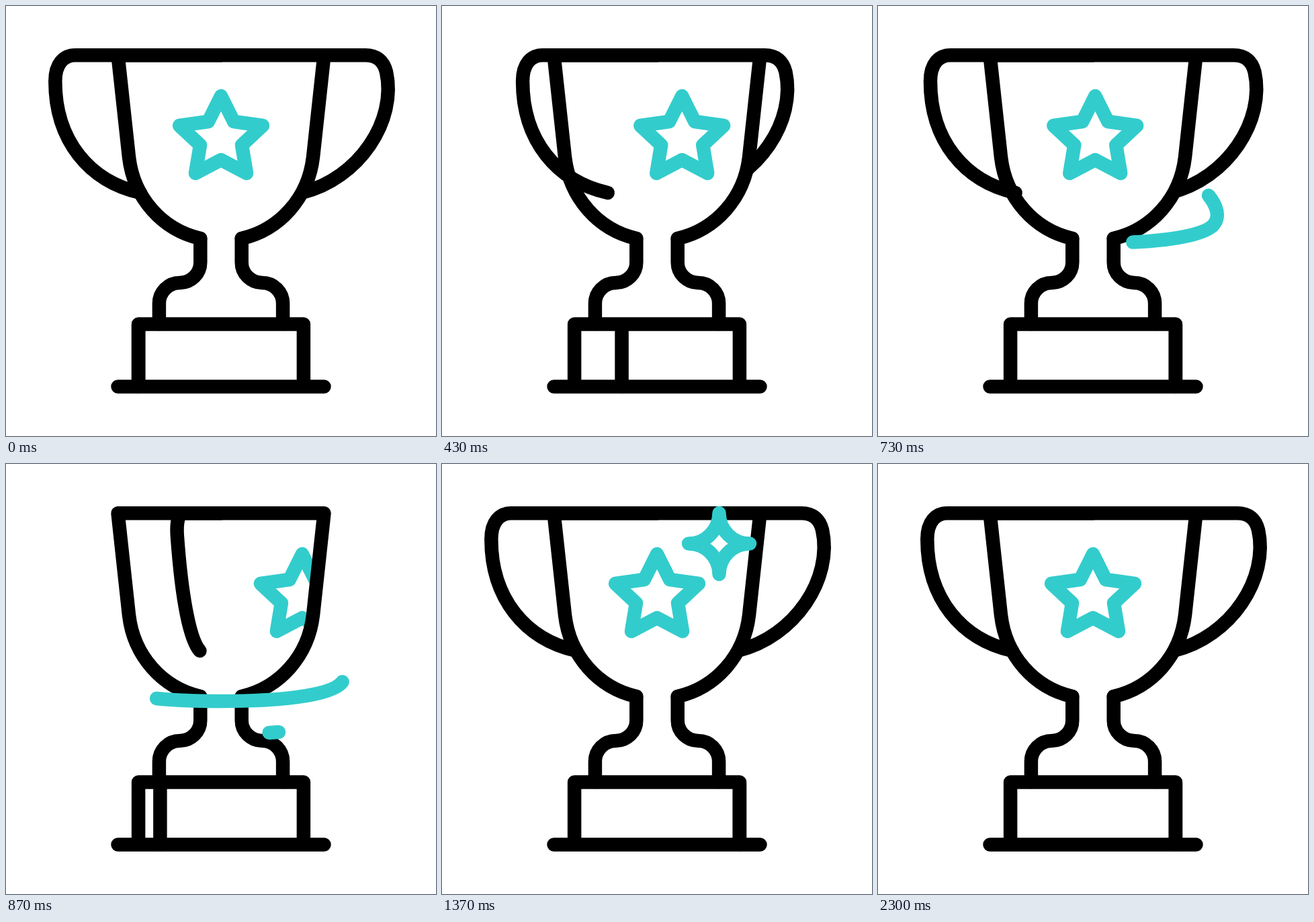
These frames come from a looping animation (640 by 640 pixels, 2.5 s). An HTML page with a canvas:

```html
<!DOCTYPE html>
<html>
<head>
<meta charset="utf-8">
<title>Spinning trophy</title>
<style>
html, body { margin: 0; width: 100%; height: 100%; overflow: hidden; background: #fff; }
canvas { display: block; }
</style>
</head>
<body>
<canvas width="640" height="640"></canvas>
<script>
const ctx = document.querySelector('canvas').getContext('2d');
const LOOP = 2500, BLACK = '#000', TEAL = '#33cccc';

const cup = new Path2D('M289.3 346C232 333 190 285 183 225L166.5 73.2H473.5L457 225C450 285 408 333 350.7 346');
const stem = new Path2D('M289.3 346V381.4A30.7 30.7 0 0 1 258.6 412.1A30.7 30.7 0 0 0 227.9 442.8V473' +
  'M350.7 346V381.4A30.7 30.7 0 0 0 381.4 412.1A30.7 30.7 0 0 1 412.1 442.8V473');
const base = new Path2D('M197.1 566V473.5H442.9V566M166.5 566.6H473.5');
const star = new Path2D('M320 134L339 172L382 178L351 207L358 249L320 229L282 249L289 207L258 178L301 172Z');
const sparkle = new Path2D('M0-45.5A45.5 45.5 0 0 0 45.5 0A45.5 45.5 0 0 0 0 45.5' +
  'A45.5 45.5 0 0 0-45.5 0A45.5 45.5 0 0 0 0-45.5Z');
const upperRibbon = new Path2D('M492 282C505 298 509 314 500 325C483 346 400 353 320 353C160 353 110 328 140 295');
const lowerRibbon = new Path2D('M406 399Q320 405 234 399');

// Each handle: rim end, then two curves around the corner and down to the tip
const leftHandle = [[103, 73.2], [86, 73.2], [73.3, 86], [73.3, 112], [73.3, 200], [124, 261], [200, 278]];
const rightHandle = [[535, 73.2], [552, 73.2], [562, 82], [566, 98], [582, 170], [526, 257], [440, 278]];

const mix = (a, b, k) => a + (b - a) * k;

// Progress from 0 to 1 between two times
const sweep = (t, start, end) => Math.min(1, Math.max(0, (t - start) / (end - start)));

function stroke(path, color = BLACK) {
  ctx.strokeStyle = color;
  ctx.stroke(path);
}

function handle(points, shift) {
  const [rim, ...curve] = points.map(([x, y]) => [x + shift, y]);
  const p = new Path2D();
  p.moveTo(320, 73.2);
  p.lineTo(...rim);
  p.bezierCurveTo(...curve.slice(0, 3).flat());
  p.bezierCurveTo(...curve.slice(3).flat());
  stroke(p);
}

function backHandle(turn) {
  if (turn < 0.5) handle(rightHandle, -280 * turn);
  else handle(leftHandle, 280 * (1 - turn));
}

// Slides at first, then turns over into the opposite handle
function frontHandle(turn) {
  if (turn < 0.22) handle(leftHandle, 240 * turn);
  else handle(leftHandle.map((p, i) => p.map((v, j) => mix(v, rightHandle[i][j], turn))), 0);
}

function drawStar(turn) {
  ctx.save();
  ctx.clip(cup);
  ctx.translate(53 * Math.tan(Math.PI * turn), 0);
  stroke(star, TEAL);
  ctx.restore();
}

function ribbon(path, length, tail, head) {
  if (head <= tail) return;
  ctx.setLineDash([(head - tail) * length, 9999]);
  ctx.lineDashOffset = -tail * length;
  stroke(path, TEAL);
  ctx.setLineDash([]);
}

function drawSparkle(size) {
  if (!size) return;
  ctx.save();
  ctx.globalAlpha = size;
  ctx.translate(412.5, 118.5);
  ctx.scale(mix(0.25, 1, size), mix(0.25, 1, size));
  stroke(sparkle, TEAL);
  ctx.restore();
}

function draw(t) {
  // Two accelerating half revolutions; the base seam passes once in each
  const turn = (t < 680 ? sweep(t, 275, 662) : sweep(t, 697, 1000)) ** 1.8 % 1;
  const seam = mix(197.1, 442.9, t < 750 ? sweep(t, 341, 655) : sweep(t, 853, 990));

  ctx.fillStyle = '#fff';
  ctx.fillRect(0, 0, 640, 640);
  ctx.lineWidth = 20.5;
  ctx.lineCap = ctx.lineJoin = 'round';

  backHandle(turn);
  ctx.fill(cup);
  drawStar(turn);
  stroke(cup);
  frontHandle(turn);
  stroke(stem);
  stroke(base);
  stroke(new Path2D(`M${seam} 474V566`));

  ribbon(upperRibbon, 460, sweep(t, 842, 1130), sweep(t, 575, 990));
  ribbon(lowerRibbon, 175, sweep(t, 1030, 1300), sweep(t, 848, 1126));
  drawSparkle(sweep(t, 1170, 1370) - sweep(t, 2100, 2300));
}

const start = performance.now();
function tick() {
  draw((performance.now() - start) % LOOP);
  requestAnimationFrame(tick);
}
tick();
</script>
</body>
</html>
```
